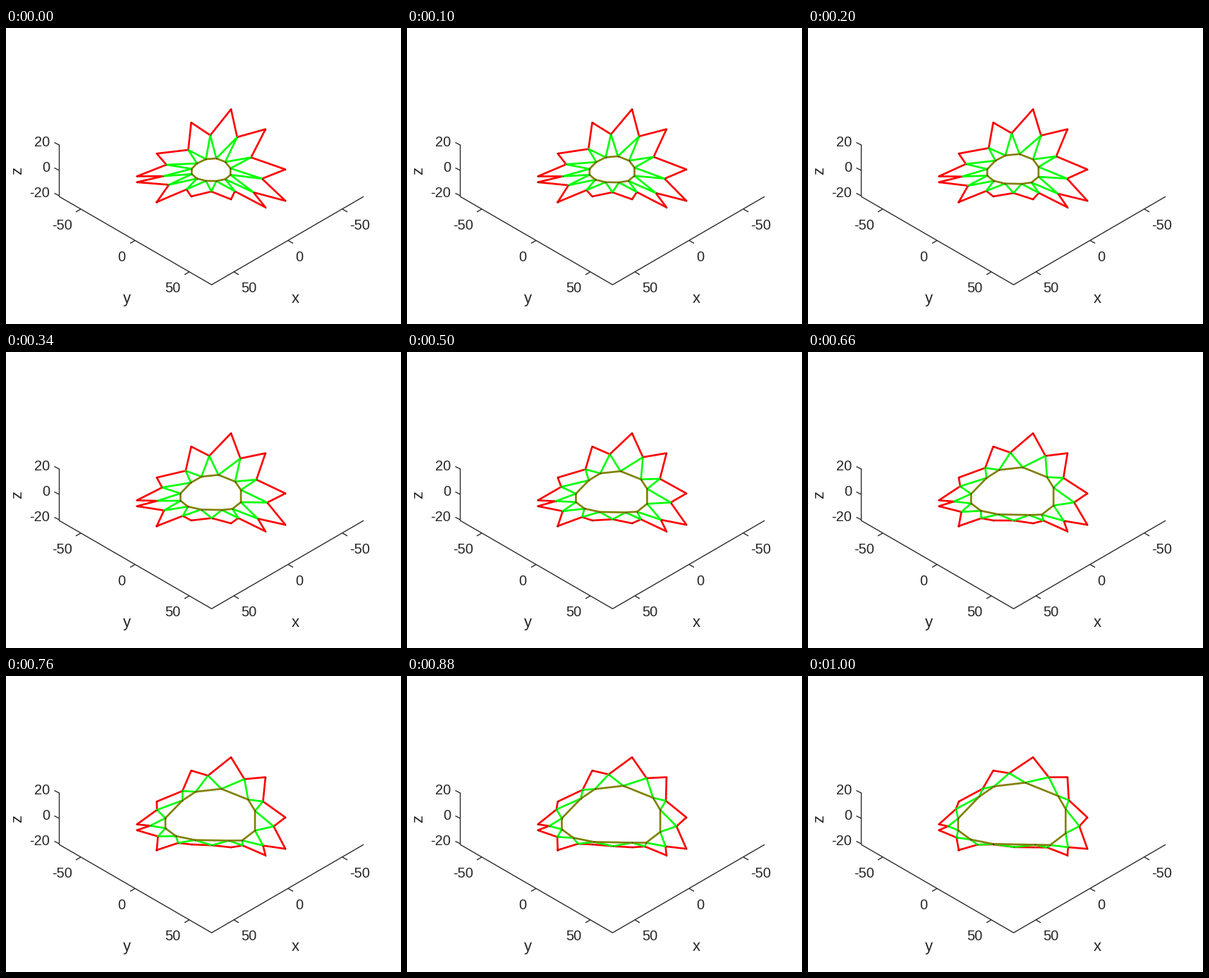
A matplotlib script for the animation above (1.02 s loop, 560 by 420 pixels).

```python
import numpy as np
import matplotlib.pyplot as plt
from matplotlib.animation import FuncAnimation

W, H, DPI = 560, 420, 100
FRAMES, STEP = 51, 20
PX = 72 / DPI
INK = "#262626"
N, RADIUS, HEIGHT = 12, 50, 15
SCALE, CX, CY = 2.18, 290.8, 202.5

plt.rcParams["font.family"] = "Liberation Sans"

fig = plt.figure(figsize=(W / DPI, H / DPI), dpi=DPI, facecolor="white")
ax = fig.add_axes([0, 0, 1, 1])
ax.set_xlim(0, W)
ax.set_ylim(H, 0)
ax.axis("off")


def project(plan, z):
    """Isometric view; plan holds x + iy."""
    p = plan * np.exp(-0.25j * np.pi)
    return np.column_stack([CX + SCALE * p.imag,
                            CY + SCALE * (p.real / np.sqrt(3) - z * np.sqrt(2 / 3))])


# Star tips on a circle, with a wave in height
i = np.arange(N)
half = np.pi / N
tip_z = HEIGHT * np.sin(4 * np.pi * i / (N - 1))
tips = project(RADIUS * np.exp(2j * half * i), tip_z)

# One side of the star per pair of neighbouring tips
normal = np.exp(1j * half * (2 * i + 1))
rise = np.roll(tip_z, -1) - tip_z
mid_z = tip_z + rise / 2
side = 2 * RADIUS * np.sin(half)


def pose(s):
    """Valley and ring points for s from 0 to 1."""
    z = (0.58 + 0.06 * s) * mid_z
    out = 31.7 + 10.8 * s + 0.013 * (1 - 0.6 * s) * (mid_z**2 - rise**2 / 2)
    along = -(0.25 + 0.75 * s) * z * rise / side
    valley = project(normal * (out + 1j * along), z)

    # Ring sides stay parallel to the star's; corners are where they meet
    d = 12.6 + 21.5 * s + 2.5 * s**2 - 0.0185 * s * mid_z**2
    prev = np.roll(d, 1)
    slide = (d - prev * np.cos(2 * half)) / np.sin(2 * half)
    ring_z = (0.15 + 0.45 * s) * (z + np.roll(z, 1)) / 2
    ring = project(np.roll(normal, 1) * (prev + 1j * slide), ring_z)
    return valley, ring


def close(p):
    return np.vstack([p, p[:1]])


def zigzag(a, b):
    return close(np.stack([a, b], axis=1).reshape(-1, 2))


def segment(*xy):
    ax.plot(xy[::2], xy[1::2], color=INK, lw=1.35 * PX, solid_capstyle="butt")


def label(x, y, s, size=20, **kw):
    ax.text(x, y, s, color=INK, fontsize=size * PX,
            **{"ha": "center", "va": "baseline", **kw})


segment(75.5, 165.5, 75.5, 239.2, 291.5, 364.3, 507, 239.2)
for k, name in enumerate(("20", "0", "-20")):
    y = 166 + 36 * k
    segment(75.5, y, 68.5, y - 3.5)
    label(62.5, y + 2, name, ha="right")

for k, name in enumerate(("-50", "0", "50")):
    x, y = 106 + 77 * k, 257 + 44.5 * k
    segment(x, y, x - 7, y + 4)
    segment(583 - x, y, 590 - x, y + 4)
    label(80 + 78 * k + 6 * (k == 1), y + 29.4, name)
    label(502 - 79 * k - 7 * (k == 1), y + 29.4, name)

label(410.5, 390.4, "x", 22)
label(171.5, 390.4, "y", 22)
label(17, 202.5, "z", 22, rotation=90, va="center")


def stroke(color):
    return ax.plot([], [], color=color, lw=2.67 * PX, solid_joinstyle="round")[0]


outer, web, inner = stroke("#ff0000"), stroke("#00ff00"), stroke("#808000")
dots, = ax.plot([], [], "o", color="#301800", ms=1.5 * PX, mew=0)


def draw(frame):
    valley, ring = pose(frame / (FRAMES - 1))
    outer.set_data(*zigzag(tips, valley).T)
    web.set_data(*zigzag(ring, valley).T)
    inner.set_data(*close(ring).T)
    dots.set_data(*np.vstack([tips, valley, ring]).T)
    return outer, web, inner, dots


anim = FuncAnimation(fig, draw, frames=FRAMES, interval=STEP,
                     repeat=True, repeat_delay=0, blit=False)
plt.show()
```
